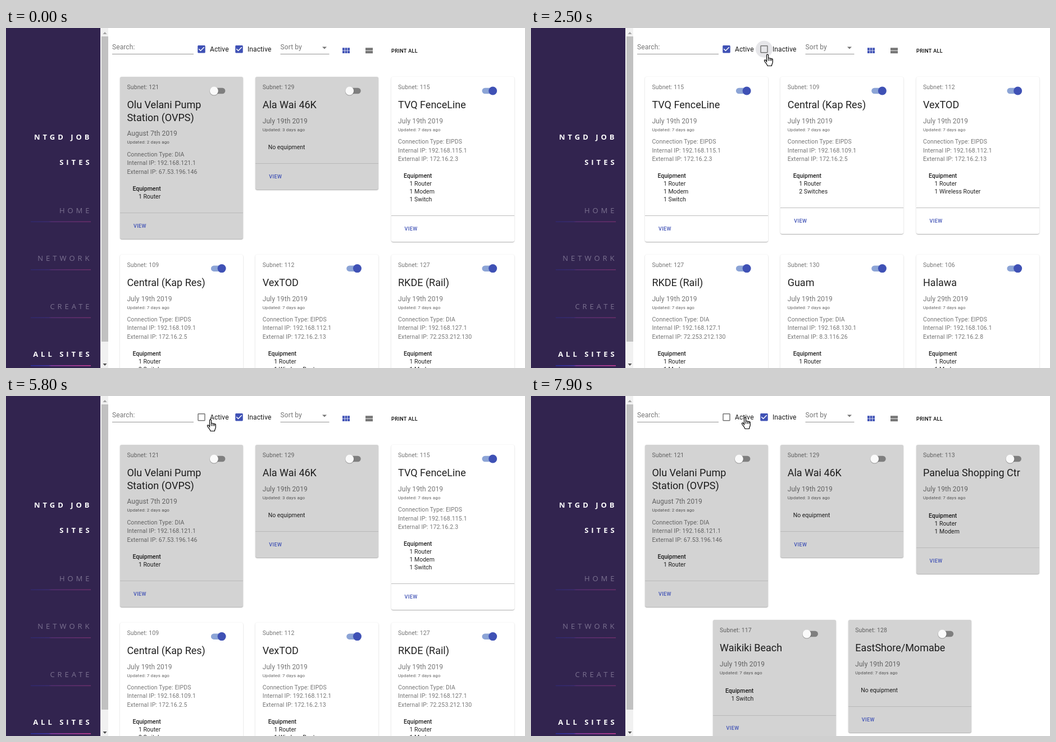
Animation, 924 px wide and 606 px high, one loop 8000 ms. Source, as an HTML page:

```html
<!DOCTYPE html>
<html lang="en">
<head>
<meta charset="utf-8">
<title>Job sites</title>
<style>
  html, body { margin: 0; width: 100%; height: 100%; overflow: hidden; background: #fff; }
  #stage { position: relative; width: 924px; height: 606px; overflow: hidden; }
  svg, .scene { position: absolute; left: 0; top: 0; width: 924px; height: 606px; }
  text { font-family: Roboto, sans-serif; font-size: 12px; fill: #000; white-space: pre; }
  .card {
    position: absolute; width: 219px; border-radius: 3px; background: #fff;
    box-shadow: 0 .75px 2.25px rgba(0,0,0,.2), 0 .75px .75px rgba(0,0,0,.14), 0 1.5px .75px -.75px rgba(0,0,0,.12);
  }
  .card.off { background: #d3d3d3; }
  .title { font-size: 18px; fill-opacity: .87; }
  .date, .hint { letter-spacing: .1px; fill-opacity: .54; }
  .label { letter-spacing: .1px; fill-opacity: .9; }
  .info { font-size: 10.5px; letter-spacing: .11px; fill-opacity: .54; }
  .small { font-size: 8px; letter-spacing: .17px; fill-opacity: .62; }
  .item { font-size: 10.5px; fill-opacity: .87; }
  .head { font-size: 10.5px; font-weight: 500; fill-opacity: .87; }
  .button { font-size: 9px; font-weight: 500; letter-spacing: .42px; }
  .view { fill: #3f51b5; }
  .nav { font-family: "Open Sans", "Noto Sans", sans-serif; font-size: 13px; letter-spacing: 5px; fill: #7b7190; text-anchor: end; }
  .nav.on { font-weight: 700; fill: #fff; }
</style>
</head>
<body>
<div id="stage"></div>
<script>
const stage = document.getElementById('stage');
const BLUE = '#3f51b5';
const text = (x, y, cls, str) => `<text x="${x}" y="${Math.round(y)}" class="${cls}">${str}</text>`;
const rect = (x, y, w, h, fill, more = '') => `<rect x="${x}" y="${y}" width="${w}" height="${h}" fill="${fill}" ${more}/>`;
const svg = body => `<svg viewBox="0 0 924 606">${body}</svg>`;

// Sites
const site = (subnet, title, kind, ip, items, more = {}) =>
  ({ subnet, title: [].concat(title), kind, ip, items, date: 'July 19th 2019', days: 7, ...more });

const pump = site(121, ['Olu Velani Pump', 'Station (OVPS)'], 'DIA', '67.53.196.146', ['1 Router'], { date: 'August 7th 2019', days: 2, off: true });
const wai = site(129, 'Ala Wai 46K', '', '', [], { days: 3, off: true });
const fence = site(115, 'TVQ FenceLine', 'EIPDS', '172.16.2.3', ['1 Router', '1 Modem', '1 Switch']);
const central = site(109, 'Central (Kap Res)', 'EIPDS', '172.16.2.5', ['1 Router', '2 Switches']);
const depot = site(112, 'VexTOD', 'EIPDS', '172.16.2.13', ['1 Router', '1 Wireless Router']);
const rail = site(127, 'RKDE (Rail)', 'DIA', '72.253.212.130', ['1 Router', '1 Modem']);
const guam = site(130, 'Guam', 'DIA', '8.3.116.26', ['1 Router']);
const halawa = site(106, 'Halawa', 'EIPDS', '172.16.2.8', ['1 Router', '1 Modem'], { date: 'July 29th 2019' });
const shops = site(113, 'Panelua Shopping Ctr', '', '', ['1 Router', '1 Modem'], { off: true });
const beach = site(117, 'Waikiki Beach', '', '', ['1 Switch'], { off: true });
const shore = site(128, 'EastShore/Momabe', '', '', [], { off: true });

function toggle(x, y, off) {
  const track = rect(x + 161.5, y - 5.2, 25.5, 10.5, off ? '#7f7f7f' : '#8ca4d6', 'rx="5.25"');
  if (!off) return track + `<circle cx="${x + 180.7}" cy="${y}" r="7.5" fill="${BLUE}"/>`;
  return track + `<circle cx="${x + 167}" cy="${y + .8}" r="8" fill="#000" fill-opacity=".22"/>`
    + `<circle cx="${x + 167}" cy="${y}" r="7.5" fill="#fafafa"/>`;
}

function card(s, x, top) {
  const left = x + 12, edge = Math.floor(x);
  let out = text(left, top + 22, 'info', 'Subnet: ' + s.subnet) + toggle(x, top + 25, s.off);
  s.title.forEach((line, i) => out += text(left, top + 56 + 22.5 * i, 'title', line));
  let y = top + 22.5 * (s.title.length - 1);
  out += text(left, y + 82.9, 'date', s.date) + text(left, y + 96.9, 'small', `Updated: ${s.days} days ago`);
  if (s.kind) {
    const lines = ['Connection Type: ' + s.kind, 'Internal IP: 192.168.' + s.subnet + '.1', 'External IP: ' + s.ip];
    lines.forEach((line, i) => out += text(left, y + 119.4 + 15.4 * i, 'info', line));
    y += 50;
  }
  if (s.items.length) {
    out += text(x + 22, y + 130, 'head', 'Equipment');
    s.items.forEach((item, i) => out += text(x + 32.5, y + 144.4 + 13.7 * i, 'item', item));
    y += 156.5 + 13.67 * s.items.length;
  } else {
    out += text(x + 22, y + 129, 'item', 'No equipment');
    y += 154.5;
  }
  out += rect(edge, Math.floor(y), 219, 1, '#000', `fill-opacity="${s.off ? .12 : .26}"`);
  out += text(x + 23.5, y + 26, 'button view', 'VIEW');
  const box = `<div class="card ${s.off ? 'off' : ''}" style="left:${edge}px;top:${top}px;height:${y + 46.5 - top}px"></div>`;
  return [box, out];
}

const COLS = [203.4, 444.7, 686], HALF = [324, 565.2], TOP = 87;
function scene(first, second, top2, cols2) {
  const cards = [...first.map((s, i) => card(s, COLS[i], TOP)), ...second.map((s, i) => card(s, cols2[i], top2))];
  return `<div class="scene">${cards.map(c => c[0]).join('')}${svg(cards.map(c => c[1]).join(''))}</div>`;
}

// Sidebar and scrollbar
function navItem(y, str, on, line) {
  let out = text(153.6, y, on ? 'nav on' : 'nav', str);
  if (line) out += rect(44, y + 15, 107, 1.6, 'url(#bar)', `opacity="${on ? 1 : .38}"`);
  return out;
}
const sidebar = `<defs><linearGradient id="bar">
    <stop offset="0" stop-color="#2b2f9c"/><stop offset=".3" stop-color="#4a38a6"/>
    <stop offset=".34" stop-color="#8a3fa8"/><stop offset="1" stop-color="#c63f96"/>
  </linearGradient></defs>`
  + rect(0, 0, 168, 606, '#32244f')
  + navItem(199, 'NTGD JOB', true) + navItem(244, 'SITES', true)
  + navItem(329.5, 'HOME', false, true) + navItem(415, 'NETWORK', false, true)
  + navItem(500.5, 'CREATE', false, true) + navItem(586, 'ALL SITES', true, true)
  + rect(168, 0, 14, 606, '#f1f1f1') + rect(170, 15, 12, 544, '#c1c1c1')
  + '<path d="M172.5 11l3.5-4 3.5 4z" fill="#a3a3a3"/><path d="M172.5 598l3.5 4 3.5-4z" fill="#505050"/>';

// Toolbar
const CHECKED = 'M19 3H5c-1.11 0-2 .9-2 2v14c0 1.1.89 2 2 2h14c1.11 0 2-.9 2-2V5c0-1.1-.89-2-2-2zm-9 14l-5-5 1.41-1.41L10 14.17l7.59-7.59L19 8l-9 9z';
const EMPTY = 'M19 5v14H5V5h14m0-2H5c-1.1 0-2 .9-2 2v14c0 1.1.9 2 2 2h14c1.1 0 2-.9 2-2V5c0-1.1-.9-2-2-2z';
const check = (id, x) => `<circle id="${id}Ripple" cx="${x}" cy="37.7" r="0"/>`
  + `<path id="${id}" transform="translate(${x - 9} 28.8) scale(.75)"/>`;
let grid = '';
for (let i = 0; i < 6; i++) grid += rect(599 + 4.6 * (i % 3), 35.3 + 5.2 * (i > 2), 3.8, 4.5, BLUE);
const toolbar = text(189, 38, 'hint', 'Search:') + rect(189, 46, 145, 1, '#949494')
  + check('active', 348) + check('inactive', 415)
  + text(363, 42, 'label', 'Active') + text(430, 42, 'label', 'Inactive')
  + text(488.5, 38, 'hint', 'Sort by') + rect(488.5, 46, 87, 1, '#949494')
  + '<path d="M563 33.5h8l-4 4z" fill="#757575"/>' + grid
  + rect(640, 35.3, 13, 4.5, '#757575') + rect(640, 40.7, 13, 4.5, '#757575')
  + text(686, 44, 'button', 'PRINT ALL');

const pointer = `<g id="cursor" fill="#fff" stroke="#000" stroke-width="1.2">
  <g id="hand"><path d="M-1 13.5V2.2a1.5 1.5 0 0 1 3 0V8c0-1.5 3-1.3 3 .3c0-1.2 2.6-1 2.6.6c0-1 2.2-.8 2.2.8V14c0 3-1.9 4-1.9 7H.5c0-2.5-3.5-5-5.3-8.5c-1-1.8 1-2.8 2.2-1.5z"/>
    <path d="M2 8v4M5 8.5V12M7.6 9v3" fill="none"/></g>
  <path id="arrow" d="M.5.5v16l3.7-3.5 2.5 5.7 2.3-1-2.5-5.6h5.2z"/></g>`;

stage.innerHTML = svg(sidebar)
  + scene([pump, wai, fence], [central, depot, rail], 403.6, COLS)
  + scene([fence, central, depot], [rail, guam, halawa], 403.6, COLS)
  + scene([pump, wai, shops], [beach, shore], 399, HALF)
  + svg(toolbar + pointer);

// Motion: [ms, x, y] of the pointer tip
const PATH = [
  [200, 28, 2], [400, 150, 70], [600, 300, 122], [800, 452, 105], [1000, 411, 54],
  [1300, 413, 37], [1400, 413, 37], [1600, 393, 44], [1800, 420, 46], [3100, 420, 46],
  [4000, 365, 43], [5700, 365, 43], [5800, 363, 41], [6000, 363, 41], [6300, 198, 150],
  [6600, 482, 173], [6800, 484, 203], [6900, 484, 203], [7500, 494, 40], [7700, 494, 40],
  [7800, 445, 39], [7900, 380, 37], [8000, 380, 37]
];
const $ = id => document.getElementById(id);
const scenes = stage.querySelectorAll('.scene');
const lerp = (a, b, k) => a + (b - a) * k;
const ramp = (t, from, to) => Math.min(1, Math.max(0, (t - from) / (to - from)));

function setCheck(id, on) {
  $(id).setAttribute('d', on ? CHECKED : EMPTY);
  $(id).setAttribute('fill', on ? BLUE : '#757575');
}
function setRipple(id, r, color, opacity) {
  const el = $(id + 'Ripple');
  el.setAttribute('r', r);
  el.setAttribute('fill', color);
  el.setAttribute('fill-opacity', opacity);
}
function setCursor(t) {
  $('cursor').style.display = t < 200 ? 'none' : '';
  if (t < 200) return;
  const i = PATH.findIndex(p => p[0] > t);
  const a = PATH[i - 1], b = PATH[i], k = ramp(t, a[0], b[0]);
  const x = lerp(a[1], b[1], k), y = lerp(a[2], b[2], k);
  const hand = y < 53 && x > 340 && x < 475;
  $('cursor').setAttribute('transform', `translate(${Math.round(x) + .5} ${Math.round(y) + .5})`);
  $('hand').style.display = hand ? '' : 'none';
  $('arrow').style.display = hand ? 'none' : '';
}

function draw() {
  const t = Math.floor(performance.now() % 8000 / 100) * 100;
  const shown = t < 2500 ? 0 : t < 4900 ? 1 : t < 5900 ? 0 : 2;
  scenes.forEach((el, i) => el.style.display = i === shown ? '' : 'none');

  setCheck('active', t < 5100);
  setCheck('inactive', t < 2500 || t >= 5100);

  if (t < 2000 || t >= 5100) setRipple('inactive', 0, '#000', 0);
  else if (t < 2500) setRipple('inactive', lerp(5, 13.5, ramp(t, 2000, 2300)), BLUE, .15);
  else setRipple('inactive', 15, '#0a0a28', lerp(.1, .21, ramp(t, 2500, 2700)));

  const pressed = t >= 5900 && t < 6500;
  setRipple('active', pressed ? lerp(5, 14, ramp(t, 5900, 6200)) : 0, '#000', lerp(.1, .03, ramp(t, 6200, 6500)));

  setCursor(t);
  requestAnimationFrame(draw);
}
draw();
</script>
</body>
</html>
```
